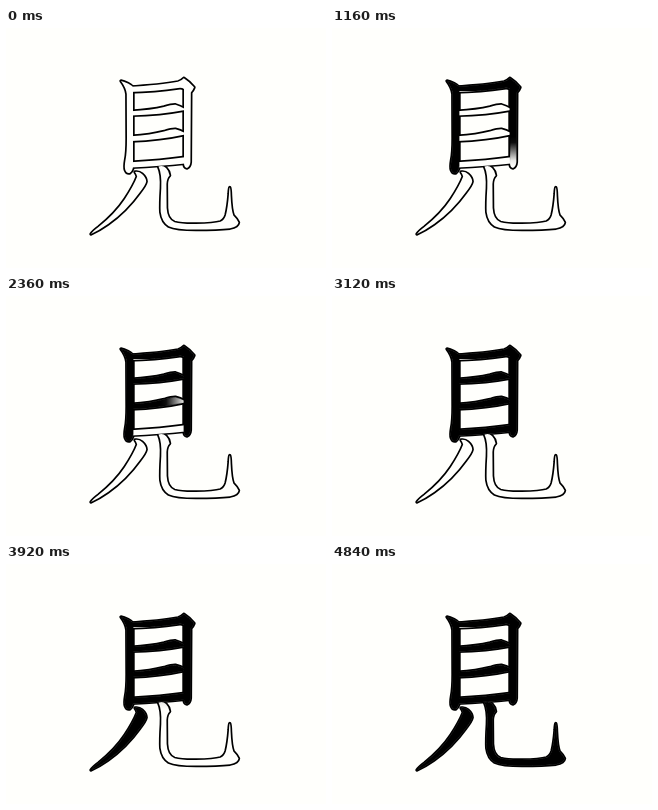
An HTML page with a canvas for the animation above (5 s loop, 320 by 240 pixels).

```html
<!DOCTYPE html>
<html lang="ja">
<head>
<meta charset="utf-8">
<title>見 stroke order</title>
<style>
html, body { margin: 0; width: 100%; height: 100%; overflow: hidden; background: #fffffc; }
canvas { display: block; width: 320px; height: 240px; }
</style>
</head>
<body>
<canvas width="320" height="240"></canvas>
<script>
const ctx = document.querySelector('canvas').getContext('2d');
const LOOP = 5000, STEP = 40, SOFT = 30;
const PAPER = '#fffffc', INK = '#000';

// Each wipe: first and last change, start and end of its axis, optional clip box.
const strokes = [
  {
    path: 'M115 53 Q118 53.5 122 55.5 Q126 57.5 127 59.5 L127 138 Q127 142.5 123.5 145 Q120.5 145.5 119.3 142 Q118.3 139 119.5 132 Q121 125 121 110 L120.8 66 Q120 59.5 115 53Z',
    wipes: [{ t: [40, 600], from: [120, 49], to: [120, 147] }]
  },
  {
    path: 'M122 59 Q155 57 172 53.8 Q175.5 53 177.8 50.3 Q183.5 54 188 59.3 Q187 62 184.8 64.5 L184.4 134 Q184 138.5 181 140 Q178 139.5 178 135 L178 61 Q176 59.4 172 60 Q150 63.3 122 64Z',
    wipes: [
      { t: [800, 1040], from: [118, 57], to: [185, 57], box: [110, 45, 90, 18] },
      { t: [1000, 1240], from: [181, 50], to: [181, 144], box: [170, 63, 30, 85] }
    ]
  },
  {
    path: 'M125 83.2 Q145 82.2 158 79 Q166 76.6 169.5 76.8 Q174 78 179 81 L179 82 Q155 86.6 125 87.4Z',
    wipes: [{ t: [1400, 1840], from: [127, 82], to: [177, 82] }]
  },
  {
    path: 'M125 108.2 Q145 107 158 103.5 Q166 101 169.5 101.2 Q174 102.2 179 105 L179 106.5 Q155 111.8 125 113Z',
    wipes: [{ t: [2000, 2520], from: [127, 107], to: [177, 107] }]
  },
  {
    path: 'M125 134.3 Q155 132.6 179 129.3 L179 135.4 Q155 138 125 139.4Z',
    wipes: [{ t: [2680, 3120], from: [127, 135], to: [177, 135] }]
  },
  {
    path: 'M129 144 Q133 143.3 136 146 Q140 149.5 140.2 153.5 Q139.5 157 134 164 Q120 183.5 102 196 Q93 202.3 85 206 Q86.5 203.5 92.5 199 Q109 186 119 171 Q128 157 131.2 148.5 Q130.5 146 129 144Z',
    wipes: [{ t: [3320, 3800], from: [136, 144], to: [84, 207] }]
  },
  {
    path: 'M152.5 138.5 Q157 137 160 140 Q163 143 163.6 147.5 Q160.7 150 160.4 156 L160.6 180 Q161.2 191.5 168.5 194.3 Q176 196.3 190 196 Q208 195.7 214.5 193.8 Q218.5 192 220 187 Q222 179 223 166 Q223.2 160 223.8 159.5 Q224.4 160 224.6 168 Q225.2 182 227.3 187.5 Q230.5 190.5 232.5 194.5 Q232 198.5 224 200.2 Q212 201.6 190 201.6 Q170 201.6 162.8 198.2 Q156 194 154.7 184 Q154.3 176 155.3 160 Q156 146 152.5 138.5Z',
    wipes: [
      { t: [3920, 4320], from: [158, 137], to: [158, 195], box: [145, 130, 25, 58] },
      { t: [4200, 4720], from: [150, 198], to: [234, 198], box: [145, 188, 95, 20] },
      { t: [4560, 4840], from: [224, 190], to: [224, 157], box: [214, 150, 26, 38] }
    ]
  }
].map(s => ({ path: new Path2D(s.path), wipes: s.wipes }));

function drawWipe(path, { t: [start, end], from: [x, y], to, box }, now) {
  const p = Math.min(1, (now - start + STEP) / (end - start + STEP));
  if (p <= 0) return;
  const dx = to[0] - x, dy = to[1] - y, len = Math.hypot(dx, dy);
  const head = p * (len + SOFT);
  const at = d => [x + dx * d / len, y + dy * d / len];
  const ink = ctx.createLinearGradient(...at(head - SOFT), ...at(head));
  ink.addColorStop(0, '#000');
  ink.addColorStop(0.2, 'rgba(0,0,0,0.95)');
  ink.addColorStop(0.8, 'rgba(0,0,0,0.08)');
  ink.addColorStop(1, 'rgba(0,0,0,0)');
  ctx.save();
  if (box) {
    ctx.beginPath();
    ctx.rect(...box);
    ctx.clip();
  }
  ctx.fillStyle = ctx.strokeStyle = p < 1 ? ink : INK;
  ctx.lineWidth = 0.8;
  ctx.fill(path);
  ctx.stroke(path);
  ctx.restore();
}

function draw(now) {
  ctx.fillStyle = PAPER;
  ctx.fillRect(0, 0, 320, 240);
  // Filling after all outlines merges the strokes into one glyph outline.
  ctx.strokeStyle = INK;
  ctx.lineWidth = 3.4;
  ctx.lineJoin = 'round';
  for (const s of strokes) ctx.stroke(s.path);
  for (const s of strokes) ctx.fill(s.path);
  for (const s of strokes)
    for (const w of s.wipes) drawWipe(s.path, w, now);
}

const t0 = performance.now();
function tick() {
  const t = (performance.now() - t0) % LOOP;
  draw(Math.floor(t / STEP) * STEP);
  requestAnimationFrame(tick);
}
tick();
</script>
</body>
</html>
```
